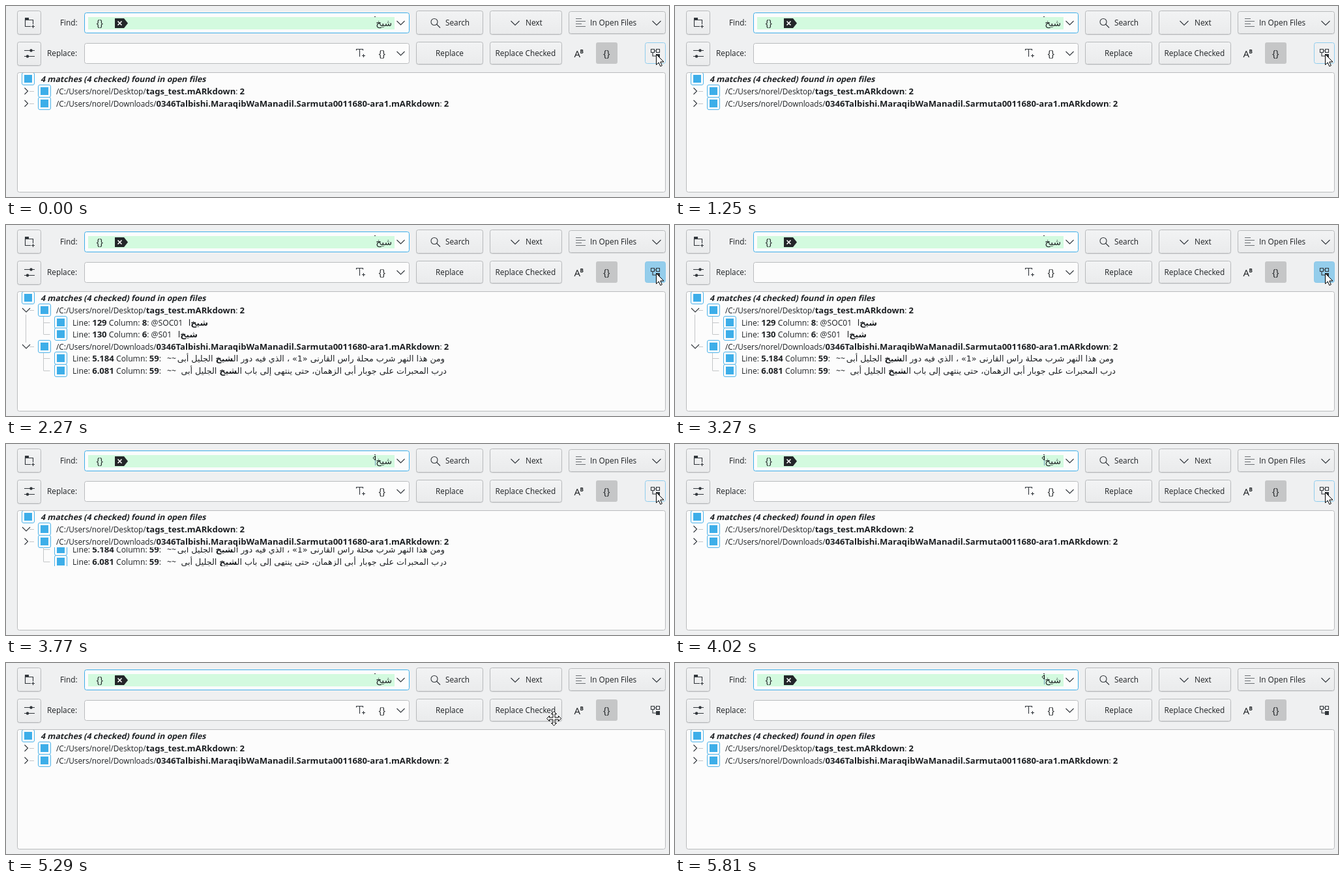
These frames come from a looping animation (1017x294 px, 5910 ms). An HTML page:

```html
<!DOCTYPE html>
<html lang="en">
<head>
<meta charset="utf-8">
<title>Search and replace panel</title>
<style>
  html, body { margin: 0; width: 100%; height: 100%; overflow: hidden; background: #eff0f1; }
  svg { display: block; width: 100%; height: 100%; }
  text { font: 11.8px "Open Sans", "Noto Sans", sans-serif; fill: #1d2023; white-space: pre; }
  .match { font-size: 12.2px; }
  .braces { font-size: 14px; }
  .bold { font: 700 13.1px "Noto Sans", "Open Sans", sans-serif; }
  .heading { font-size: 12.35px; }
  .arabic { font: 12.7px "DejaVu Sans", sans-serif; direction: rtl; }
  .arabic .bold { font: 700 12.7px "DejaVu Sans", sans-serif; }
  .ink { fill: none; stroke: #31363b; stroke-width: 1.1; }
  .tree { fill: none; stroke: #c4c6c8; }
</style>
</head>
<body>
<svg id="stage" viewBox="0 0 1017 294" xmlns="http://www.w3.org/2000/svg"></svg>
<script>
const LOOP = 5910;
const CARET_FLIPS = [750, 1250, 1770, 2270, 2770, 3270, 3770, 4270, 4770, 5290, 5810];
const EXPAND = 1770, COLLAPSE = 3770, COLLAPSED = 4020, LEAVE = 5020;
const DRAG_START = 5290, DRAG_END = 5540;
const ROW = 18.6, FIRST_ROW = 131;

const rowY = i => Math.round(FIRST_ROW + i * ROW);

// Words between asterisks become bold.
const rich = s => s.replace(/\*(.+?)\*/g, '<tspan class="bold">$1</tspan>');
const text = (x, y, s, cls = '') => `<text x="${x}" y="${y}" class="${cls}">${rich(s)}</text>`;
const arabic = (right, y, s) => text(right, y, s, 'arabic');
const path = (d, cls = 'ink', more = '') => `<path d="${d}" class="${cls}" ${more}/>`;
const rect = (x, y, w, h, fill, stroke = 'none', r = 0) =>
  `<rect x="${x}" y="${y}" width="${w}" height="${h}" rx="${r}" fill="${fill}" stroke="${stroke}"/>`;
const dot = (x, y, r) => `<circle cx="${x}" cy="${y}" r="${r}" fill="#31363b"/>`;
const group = (id, body, more = '') => `<g id="${id}" ${more}>${body}</g>`;

const button = (x, y, w, h) =>
  rect(x + .5, y + 1.5, w, h, 'none', '#d9dadc', 3) +
  rect(x + .5, y + .5, w, h, 'url(#face)', '#b7b9bb', 3);
const chevronDown = (x, y, w = 12) => path(`M${x} ${y}l${w / 2} ${w / 2}l${w / 2} ${-w / 2}`);
const chevronRight = y => path(`M28.5 ${y - 5}l5 5l-5 5`);

const checkbox = (cx, cy) =>
  rect(cx - 9.5, cy - 9.5, 19, 19, '#fcfcfc', '#4db3ea', 2.5) +
  rect(cx - 6, cy - 6, 12, 12, '#3daee9');

function fileRow(y, label) {
  return path(`M36 ${y + .5}h7`, 'tree') + checkbox(59, y) + text(77, y + 4.7, label);
}

function matchRow(y, label) {
  return path(`M57.5 ${y + .5}h10`, 'tree') + checkbox(84, y) + text(102, y + 4.5, label, 'match');
}

const firstFile = '/C:/Users/norel/Desktop/*tags_test.mARkdown*: *2*';
const secondFile = '/C:/Users/norel/Downloads/*0346Talbishi.MaraqibWaManadil.Sarmuta0011680-ara1.mARkdown*: *2*';

function shortMatch(i, label, right) {
  const y = rowY(i);
  return matchRow(y, label) + arabic(right, y + 4.5, '*شيخ*&zwnj;ا');
}

function longMatch(i, label, right, words) {
  const y = rowY(i), base = y + 4.5;
  return matchRow(y, label) + text(247, base, '~~', 'match') + arabic(right, base, words);
}

const longMatches =
  path(`M57.5 ${rowY(3) + 10}V${rowY(5)}`, 'tree') +
  longMatch(4, 'Line: *5.184* Column: *59*:', 673,
    'ومن هذا النهر شرب محلة راس القارنى «1» ، الذي فيه دور ال*شيخ* الجليل أبى') +
  longMatch(5, 'Line: *6.081* Column: *59*:', 676,
    'درب المحبرات على جوبار أبى الزهمان، حتى ينتهى إلى باب ال*شيخ* الجليل أبى');

const toolbar =
  // left column
  button(17, 7, 36, 36) +
  path('M29.5 20V31.5H38M35 21.5H41.5V28') + rect(29, 18, 6, 4, '#31363b') +
  path('M39 31.5h5M41.5 29v5') +
  button(17, 55, 36, 36) +
  path('M28 68.5H44M28 77.5H44') + dot(38.5, 68.5, 2.2) + dot(33, 77.5, 2.2) +
  text(83, 30, 'Find:') + text(63, 77, 'Replace:') +
  // find field
  rect(120.5, 10.5, 498, 31, '#fcfcfc', '#3daee9', 3) +
  rect(126, 17, 470, 19, '#d3fadf') +
  text(138.5, 30.5, '{}', 'braces') +
  path('M167 19H181L187 26.5L181 34H167Z', '', 'fill="#232629"') +
  path('M171.5 23.5l6 6m0-6l-6 6', '', 'stroke="#fff" stroke-width="1.6"') +
  `<text x="592" y="31" class="arabic" style="font-size:13.8px">شيخ</text>` +
  path('M565 16.5h2') +
  chevronDown(599.5, 23) +
  // replace field
  rect(120.5, 57.5, 498, 31, '#fcfcfc', '#b9bbbd', 3) +
  path('M537.5 68.5V66.5H547.5V68.5M542.5 66.5V78M546 76.5h5M548.5 74v5') +
  text(571.5, 77.5, '{}', 'braces') + chevronDown(599.5, 70) +
  // action buttons
  button(629, 7, 102, 36) +
  '<circle cx="657" cy="24.5" r="5" class="ink"/>' + path('M660.5 28L666 33.5') +
  text(674, 30, 'Search') +
  button(742, 7, 110, 36) + chevronDown(774.5, 23, 13) + text(797, 30, 'Next') +
  button(863, 8, 148, 34) +
  path('M874 19.5h9M874 23.5h15M874 27.5h9M874 31.5h15', 'ink', 'style="stroke:#6b6f73"') +
  text(896, 30, 'In Open Files') + chevronDown(991.5, 23, 13) +
  button(629, 55, 102, 34) + text(659, 77, 'Replace') +
  button(742, 55, 110, 34) + text(750.5, 77, 'Replace Checked') +
  // option toggles
  `<text x="871.5" y="79" style="font-size:15px">A</text>` +
  `<text x="880.5" y="73" style="font-size:8px;font-weight:700">B</text>` +
  rect(905, 56, 33, 33, '#c5c6c7', 'none', 3) + text(916, 77.5, '{}', 'braces');

const treeIcon =
  path('M989.5 66.5h5v5h-5zM997.5 66.5h5v5h-5zM994.5 69h3M992 71.5v5.5h5') +
  rect(997, 74, 6, 6, '#31363b');

const list =
  rect(17.5, 102.5, 994, 184, '#fcfcfc', '#b9bbbd', 3) +
  `<g clip-path="url(#listClip)">${checkbox(34, 112)}</g>` +
  `<text class="bold heading" transform="translate(53 117) skewX(-13)">4 matches (4 checked) found in open files</text>` +
  fileRow(rowY(0), firstFile);

const stage = document.getElementById('stage');
stage.innerHTML = `
  <defs>
    <linearGradient id="face" x2="0" y2="1">
      <stop stop-color="#f2f3f4"/><stop offset="1" stop-color="#eaebec"/>
    </linearGradient>
    <clipPath id="listClip"><rect x="18" y="103" width="993" height="183"/></clipPath>
    <clipPath id="slideClip"><rect x="18" y="159" width="993" height="29"/></clipPath>
  </defs>` +
  toolbar +
  group('caret',
    path('M566.5 25V33', '', 'stroke="#6f9bb5"') +
    path('M566.5 25V18.5L563 21.5L566.5 25', '', 'fill="none" stroke="#000"')) +
  group('hover', rect(980.5, 56.5, 31, 32, '#eff0f1', '#8fcdee', 3)) +
  group('pressed', rect(980.5, 56.5, 31, 32, '#94cdeb', '#8ac8ea', 3)) +
  treeIcon + list +
  group('firstClosed', chevronRight(rowY(0))) +
  group('firstOpen', chevronDown(25, rowY(0) - 3)) +
  group('secondNear', chevronRight(rowY(1)) + fileRow(rowY(1), secondFile)) +
  group('expanded',
    path(`M30.5 ${rowY(0) + 7}V${rowY(3) - 6}M57.5 ${rowY(0) + 10}V${rowY(2)}`, 'tree') +
    shortMatch(1, 'Line: *129* Column: *8*: @SOC01', 310) +
    shortMatch(2, 'Line: *130* Column: *6*: @S01', 294) +
    chevronDown(25, rowY(3) - 3) + fileRow(rowY(3), secondFile) + longMatches) +
  group('sliding', `<g transform="translate(0 -43)">${longMatches}</g>`, 'clip-path="url(#slideClip)"') +
  group('pointer', path('M997.5 74.5V90.5L1001.2 87L1003.8 92.8L1006.3 91.7L1003.8 86H1009Z', '',
    'fill="#fff" stroke="#000"')) +
  group('dragPointer', path('M0-11L4-7H1.5V-1.5H7V-4L11 0L7 4V1.5H1.5V7H4L0 11L-4 7H-1.5V1.5H-7V4L-11 0L-7-4V-1.5H-1.5V-7H-4Z', '',
    'fill="#fff" stroke="#000"'), 'transform="translate(840.5 85.5)"');

const parts = {};
stage.querySelectorAll('g[id]').forEach(g => parts[g.id] = g);
const show = (id, on) => parts[id].style.display = on ? '' : 'none';

function render(t) {
  const within = (from, to) => t >= from && t < to;
  const expanded = within(EXPAND, COLLAPSE);
  const firstOpen = within(EXPAND, COLLAPSED);
  show('caret', CARET_FLIPS.filter(flip => t >= flip).length % 2 === 1);
  show('pressed', expanded);
  show('hover', !expanded && t < LEAVE);
  show('pointer', t < LEAVE);
  show('dragPointer', within(DRAG_START, DRAG_END));
  show('firstOpen', firstOpen);
  show('firstClosed', !firstOpen);
  show('expanded', expanded);
  show('secondNear', !expanded);
  show('sliding', within(COLLAPSE, COLLAPSED));
}

const start = performance.now();
function tick() {
  render((performance.now() - start) % LOOP);
  requestAnimationFrame(tick);
}
tick();
</script>
</body>
</html>
```
